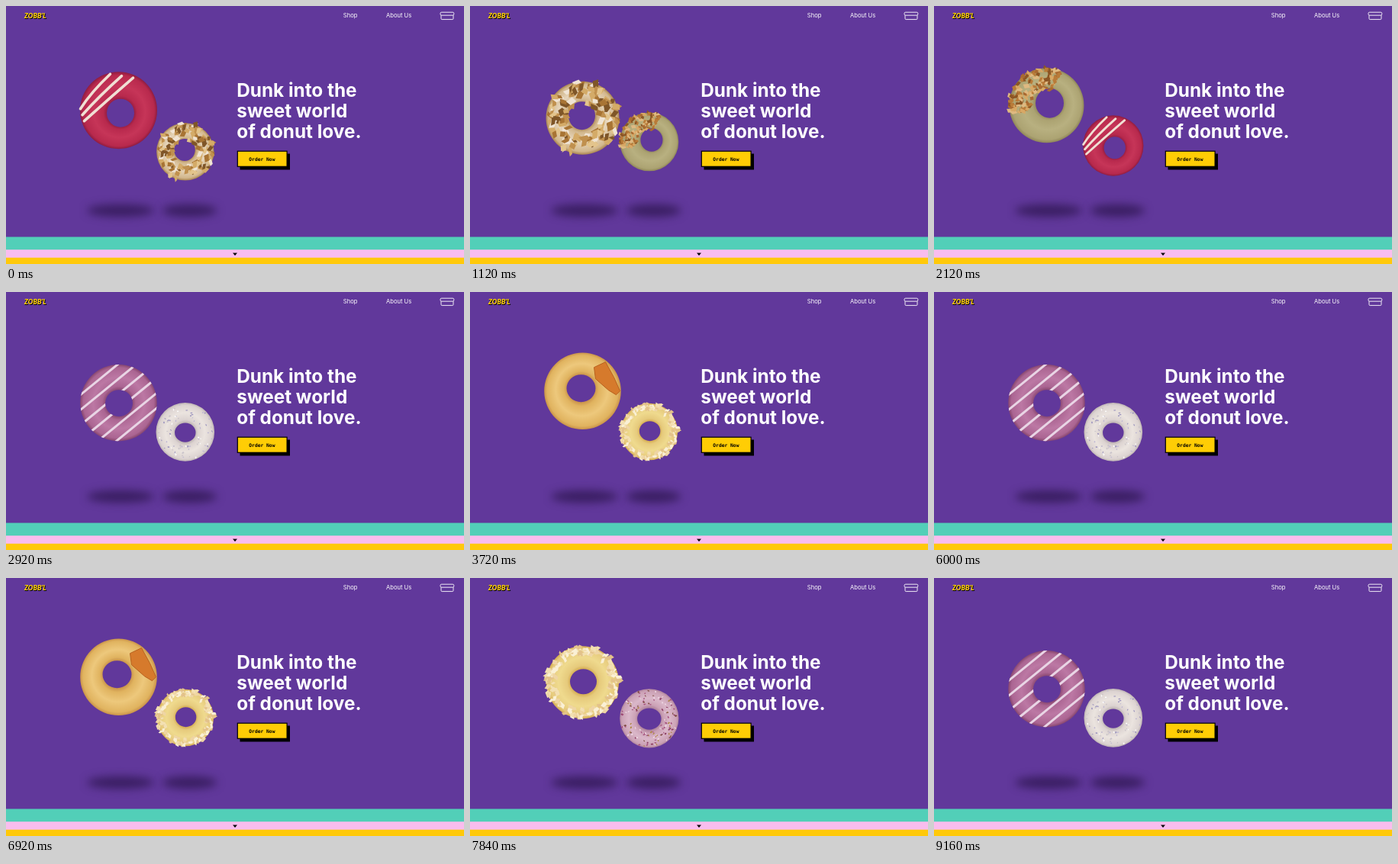
Animation, 600 px wide and 338 px high, one loop 9.2 s. Source, as an HTML page with a canvas:

```html
<!DOCTYPE html>
<html lang="en">
<head>
<meta charset="utf-8">
<title>Donut shop</title>
<style>
  html, body { margin: 0; width: 100%; height: 100%; overflow: hidden; background: #61389b; }
  canvas, svg { position: absolute; left: 0; top: 0; width: 600px; height: 338px; }
  text { font-family: Inter, sans-serif; fill: #fff; }
  .nav { font-size: 7.6px; font-weight: 400; }
  .title { font-size: 24.3px; font-weight: 700; }
  .order { font: 700 6.3px "DejaVu Sans Mono", monospace; fill: #000; }
  .brand { font: italic 900 8.8px Lato, sans-serif; }
</style>
</head>
<body>
<canvas id="stage" width="600" height="338"></canvas>
<svg viewBox="0 0 600 338">
  <text class="brand" x="24.8" y="16.6" style="fill:#000">ZOBB'L</text>
  <text class="brand" x="24" y="15.8" style="fill:#ffcf0a">ZOBB'L</text>
  <text class="nav" x="441.8" y="15.2">Shop</text>
  <text class="nav" x="498" y="15.2">About Us</text>
  <text class="title" x="302.3" y="118.5">Dunk into the</text>
  <text class="title" x="302.3" y="146">sweet world</text>
  <text class="title" x="302.3" y="173.3">of donut love.</text>
  <g fill="none" stroke="#fff" stroke-width="0.9">
    <rect x="569" y="8.2" width="17.8" height="4" rx="1.6"/>
    <path d="M570 12.2V16.4Q570 17.6 571.2 17.6H584.8Q586 17.6 586 16.4V12.2"/>
  </g>
  <rect x="306.5" y="193.5" width="65.5" height="21"/>
  <rect x="303.3" y="190.2" width="64.8" height="20.1" fill="#ffcd05" stroke="#000" stroke-width="1.2"/>
  <text class="order" x="318.3" y="203">Order Now</text>
</svg>
<script>
const ctx = document.getElementById('stage').getContext('2d');
const LOOP = 9200, FIRST = 310, STEP = 350, LEAD = 3;

// Donuts in order of appearance; hole is [x, y, rx, ry] on a ring of radius ~50
const donuts = [
  { dy: 0, r: 50.5, hole: [2.5, 3.5, 18, 18.5], tones: ['#8f1c40', '#c63558', '#b8294d'], top: icing },
  { dy: -7, r: 50.3, hole: [-2, -3.5, 19, 18], tones: ['#c9924a', '#edc87c', '#e0b35f'], top: fruit },
  { dy: 0.5, r: 48.8, hole: [0, 1, 17.5, 16], tones: ['#bfb5b4', '#ebe4df', '#dcd3d1'],
    top: () => scatter(75, 24, 47, 4, ['#9a93bd', '#bdb6d3', '#ffffff', '#c9c3c8']) },
  { dy: 10, r: 48, hole: [-1, -3, 17.5, 18.5], tones: ['#a98450', '#e6d5bb', '#d2b78c'],
    top: () => scatter(125, 21, 50, 14, ['#c0904e', '#e3c48c', '#7f5628', '#f0e4d4', '#a87434', '#d4ab68']) },
  { dy: 0, r: 47.5, hole: [1, -1, 17.5, 16.5], tones: ['#d5ad52', '#efda8e', '#e6ca7c'],
    top: () => scatter(150, 37, 50, 10, ['#f3e0b2', '#e3c28a', '#faf0d5', '#efd5a4']) },
  { dy: 0, r: 49.5, hole: [0, 0, 17.5, 17.5], tones: ['#70401f', '#b0733f', '#8f562c'], top: () => {} },
  { dy: -6.5, r: 49, hole: [4, -3, 18.5, 19.5], tones: ['#8f8659', '#b8b080', '#aca372'],
    top: () => scatter(125, 22, 51, 9.5, ['#b97b38', '#d8a865', '#8c5624', '#dfb981', '#a96a31'], 2.9, 5.1) },
  { dy: 1, r: 49.2, hole: [0, 1, 20, 18], tones: ['#b0849d', '#dab7c9', '#cba1b5'],
    top: () => scatter(120, 23, 48, 4.5, ['#8b3b61', '#b08847', '#efd9e4', '#7c4a3c', '#a34d7a']) },
  { dy: 8.5, r: 50.2, hole: [0.5, 0.5, 18, 17.5], tones: ['#87466f', '#bc78a4', '#ab6592'], top: ribbons }
];

let seed = 1;
function rand() {
  seed = (seed * 16807) % 2147483647;
  return seed / 2147483647;
}

function scatter(count, inner, outer, size, colors, from = 0, to = Math.PI * 2) {
  for (let i = 0; i < count; i++) {
    const angle = from + (to - from) * rand();
    const radius = Math.sqrt(inner ** 2 + (outer ** 2 - inner ** 2) * rand()) - size * 0.15;
    const w = size * (0.6 + rand() * 0.5), h = size * (0.3 + rand() * 0.35);
    ctx.save();
    ctx.translate(Math.cos(angle) * radius, Math.sin(angle) * radius);
    ctx.rotate(rand() * Math.PI);
    ctx.fillStyle = colors[Math.floor(rand() * colors.length)];
    ctx.beginPath();
    ctx.moveTo(-w / 2, -h / 3);
    ctx.lineTo(w / 4, -h / 2);
    ctx.lineTo(w / 2, h / 4);
    ctx.lineTo(-w / 4, h / 2);
    ctx.fill();
    ctx.restore();
  }
}

function icing() {
  ctx.strokeStyle = '#f0e0d4';
  ctx.lineWidth = 3.6;
  ctx.lineCap = 'round';
  for (let i = 0; i < 3; i++) {
    ctx.beginPath();
    ctx.moveTo(-50 + i * 2.5, -2 + i * 8);
    ctx.quadraticCurveTo(-36 + i * 11, -24 + i * 5, -11 + i * 15, -47.5 + i * 2.5);
    ctx.stroke();
  }
}

function ribbons(donut) {
  ringPath(donut);
  ctx.clip('evenodd');
  ctx.strokeStyle = '#e9d5e5';
  ctx.lineWidth = 3;
  for (let i = -4; i <= 3; i++) {
    const x = i * 12 + 5, y = i * 10 + 4;
    ctx.beginPath();
    ctx.moveTo(x - 60, y + 49);
    ctx.lineTo(x + 60, y - 49);
    ctx.stroke();
  }
}

function fruit() {
  const points = [[15, -31], [30, -38], [41, -18], [49, 0], [44, 5], [34, -1], [17, -16]];
  ctx.beginPath();
  points.forEach(([x, y]) => ctx.lineTo(x, y));
  ctx.closePath();
  ctx.fillStyle = '#d67a2c';
  ctx.fill();
  ctx.strokeStyle = '#b8611e';
  ctx.lineWidth = 1;
  ctx.stroke();
}

function ringPath({ r, hole: [x, y, rx, ry] }) {
  ctx.beginPath();
  ctx.ellipse(0, 0, r, r, 0, 0, Math.PI * 2);
  ctx.moveTo(x + rx, y);
  ctx.ellipse(x, y, rx, ry, 0, 0, Math.PI * 2);
}

function drawDonut(index, x, y, scale) {
  const donut = donuts[index % donuts.length];
  const [dark, light, mid] = donut.tones;
  const [hx, hy, hr] = donut.hole;
  const shade = ctx.createRadialGradient(hx, hy, hr - 1, 0, 0, donut.r);
  [[0, dark], [0.15, mid], [0.5, light], [0.88, mid], [1, dark]].forEach(s => shade.addColorStop(...s));
  seed = 97 + index % donuts.length * 311;
  ctx.save();
  ctx.translate(x, y + donut.dy * scale);
  ctx.scale(scale, scale);
  ringPath(donut);
  ctx.fillStyle = shade;
  ctx.fill('evenodd');
  donut.top(donut);
  ctx.restore();
}

function band(color, top) {
  ctx.fillStyle = color;
  ctx.fillRect(0, top, 600, 338 - top);
}

function shadow(x, rx) {
  ctx.save();
  ctx.filter = 'blur(6px)';
  ctx.fillStyle = 'rgba(42, 20, 76, 0.72)';
  ctx.beginPath();
  ctx.ellipse(x, 268, rx, 8, 0, 0, Math.PI * 2);
  ctx.fill();
  ctx.restore();
}

function drawPage() {
  band('#61389b', 0);
  band('#52cfb8', 302.5);
  band('#f9bdee', 319.2);
  band('#ffc90a', 329.7);
  ctx.fillStyle = '#000';
  ctx.beginPath();
  ctx.moveTo(297, 323.4);
  ctx.lineTo(303, 323.4);
  ctx.lineTo(300, 327);
  ctx.fill();
  shadow(150, 44);
  shadow(240.5, 36);
}

let shown = -1;
function frame(now) {
  const t = now % LOOP;
  const slot = Math.max(0, Math.floor((t - FIRST) / STEP) + 1) % donuts.length;
  if (slot !== shown) {
    shown = slot;
    drawPage();
    drawDonut(slot, 147.5, 136.7, 1);
    drawDonut(slot + LEAD, 234.8, 183, 0.785);
  }
  requestAnimationFrame(tick);
}

const start = performance.now();
function tick() {
  frame(performance.now() - start);
}
tick();
</script>
</body>
</html>
```
